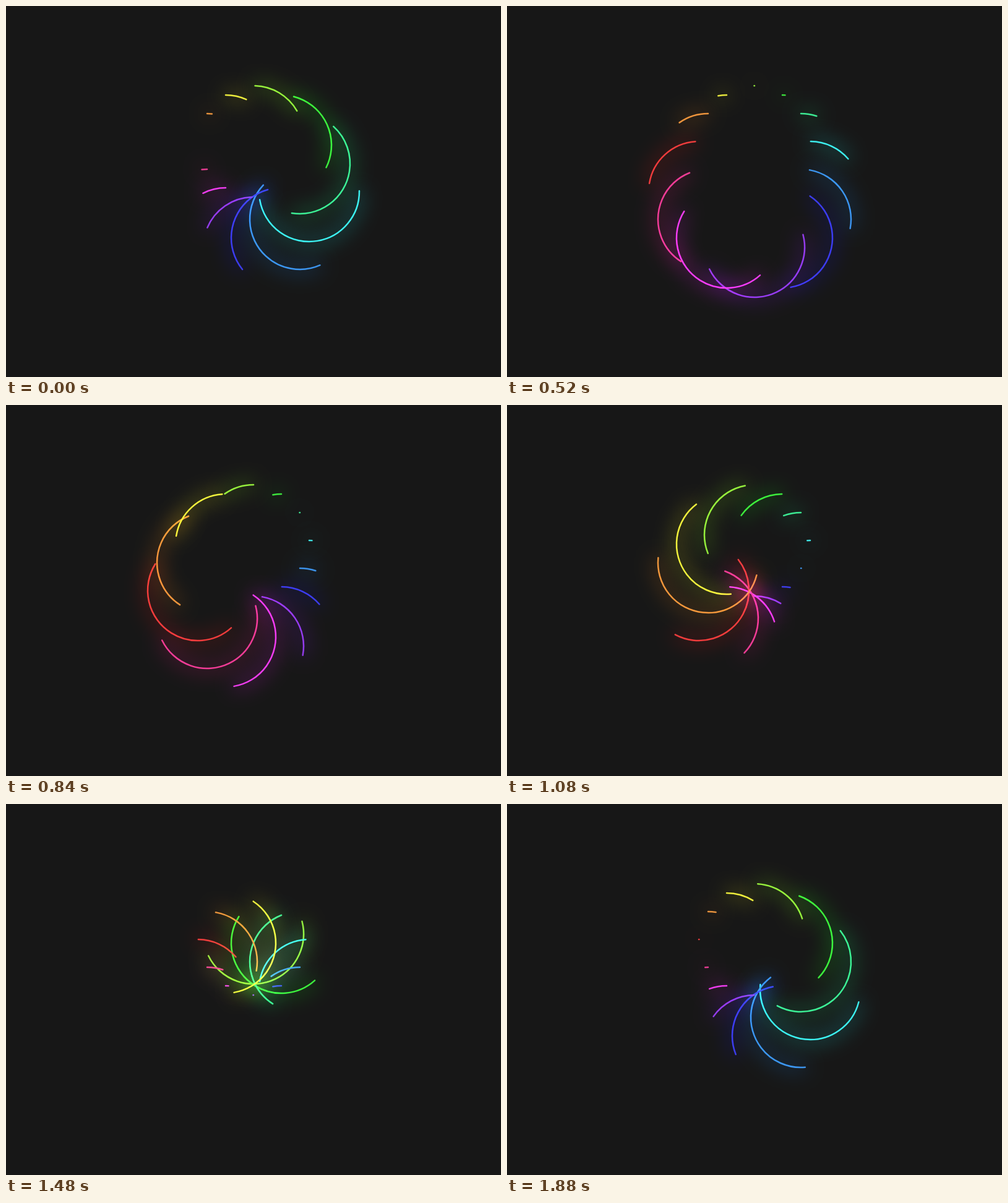
An HTML page with a canvas for the animation above (1.92 s loop, 800 by 600 pixels).

```html
<!DOCTYPE html>
<html lang="en">
<head>
<meta charset="utf-8">
<title>Rainbow arcs</title>
<style>
  html, body { margin: 0; width: 100%; height: 100%; overflow: hidden; background: #171717; }
  canvas { display: block; }
</style>
</head>
<body>
<canvas width="800" height="600"></canvas>
<script>
const ctx = document.querySelector('canvas').getContext('2d');
const LOOP = 1920, COUNT = 12, RADIUS = 81, UNIT = 15;
const SWEEP = 1536, TAIL_DELAY = 390, START = 480;
const FAR = 2000; // moves the glow's own stroke off stage

const bezier = (a, b, t) => 3 * (1 - t) * (1 - t) * t * a + 3 * (1 - t) * t * t * b + t ** 3;

function ease(x) {
  if (x <= 0) return 0;
  if (x >= 1) return 1;
  let lo = 0, hi = 1;
  for (let i = 0; i < 24; i++) {
    const mid = (lo + hi) / 2;
    if (bezier(0.49, 0.48, mid) < x) lo = mid; else hi = mid;
  }
  return bezier(0, 1, lo);
}

// Twelve circles sit on a coarse grid around the centre, clockwise from the top.
const rings = Array.from({ length: COUNT }, (_, k) => {
  const a = k * 2 * Math.PI / COUNT;
  return {
    x: 400 + UNIT * Math.round(6 * Math.sin(a)),
    y: 300 - UNIT * Math.round(6 * Math.cos(a)),
    hue: 90 + k * 30,
    delay: START + k * LOOP / COUNT
  };
});

function strokeArc({ x, y, head, tail }, dx, width, color) {
  const top = -Math.PI / 2;
  ctx.beginPath();
  ctx.arc(x + dx, y, RADIUS, top - tail, top - head, true);
  ctx.lineWidth = width;
  ctx.strokeStyle = color;
  ctx.stroke();
}

function draw(time) {
  ctx.globalCompositeOperation = 'source-over';
  ctx.shadowColor = 'transparent';
  ctx.fillStyle = '#171717';
  ctx.fillRect(0, 0, 800, 600);
  ctx.lineCap = 'round';

  const arcs = rings.map(ring => {
    const t = ((time - ring.delay) % LOOP + LOOP) % LOOP;
    return {
      ...ring,
      head: 2 * Math.PI * ease(t / SWEEP),
      tail: 2 * Math.PI * ease((t - TAIL_DELAY) / SWEEP)
    };
  }).filter(arc => arc.head - arc.tail > 0.003);

  for (const arc of arcs) strokeArc(arc, 0, 2.5, `hsl(${arc.hue}, 70%, 55%)`);

  // Glows add up, also over the lines.
  ctx.globalCompositeOperation = 'lighter';
  ctx.shadowBlur = 32;
  ctx.shadowOffsetX = FAR;
  for (const arc of arcs) {
    ctx.shadowColor = `hsl(${arc.hue}, 100%, 50%)`;
    strokeArc(arc, -FAR, 3.2, '#fff');
  }
  ctx.shadowOffsetX = 0;
}

const begin = performance.now();
function frame() {
  draw((performance.now() - begin) % LOOP);
  requestAnimationFrame(frame);
}
frame();
</script>
</body>
</html>
```
